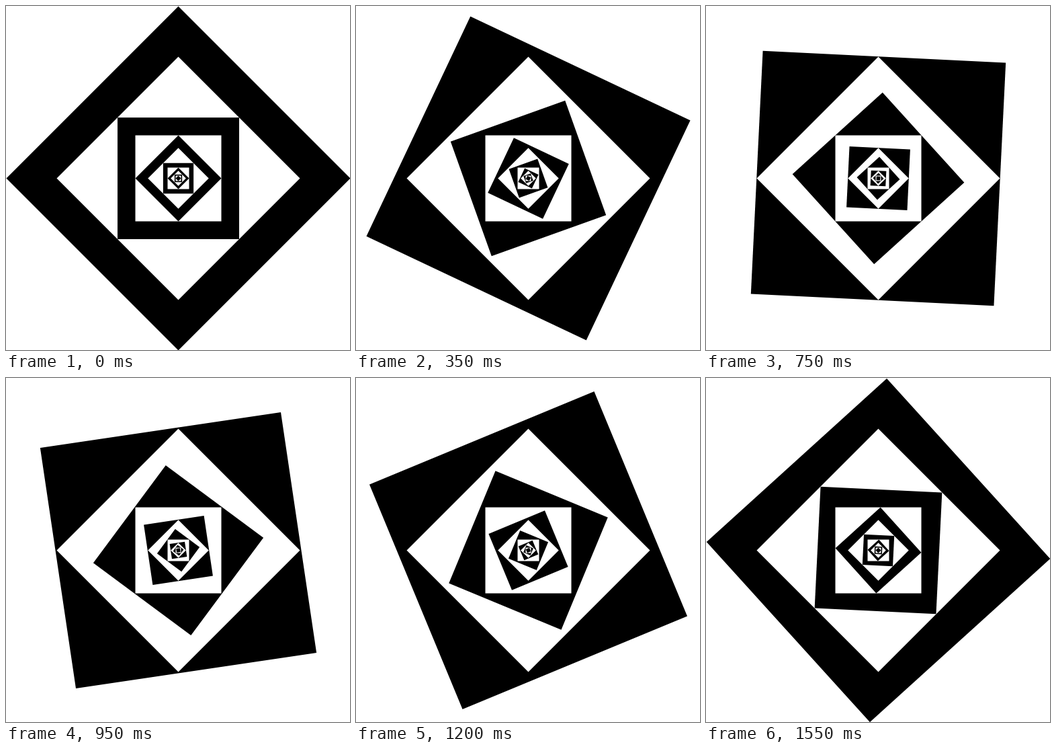
Recreate the animation shown at these times as an HTML page with a canvas. Size 512 px wide and 512 px high, loop 1600 ms.

```html
<!DOCTYPE html>
<html lang="en">
<head>
<meta charset="utf-8">
<title>Nested squares</title>
<style>
  html, body { margin: 0; width: 100%; height: 100%; overflow: hidden; background: #fff; }
  canvas { display: block; width: 512px; height: 512px; }
</style>
</head>
<body>
<canvas id="stage" width="512" height="512"></canvas>
<script>
const ctx = document.getElementById("stage").getContext("2d");
const CENTER = 256.5;
const LOOP = 1600;
const STEP = 50;
const LEVELS = 7;

// A square given by its circumradius; angle 0 stands on a corner.
function square(radius, angle, color) {
  ctx.beginPath();
  for (let i = 0; i < 4; i++) {
    const a = angle + i * Math.PI / 2;
    ctx.lineTo(CENTER + radius * Math.cos(a), CENTER + radius * Math.sin(a));
  }
  ctx.closePath();
  ctx.fillStyle = color;
  ctx.fill();
}

function draw(time) {
  const step = Math.floor((time % LOOP) / STEP);
  const turn = -(Math.PI / 2) * step * STEP / LOOP;
  ctx.fillStyle = "#fff";
  ctx.fillRect(0, 0, 512, 512);
  for (let level = 0; level < LEVELS; level++) {
    const radius = 256 / 2 ** level;
    const base = level % 2 * Math.PI / 4;
    square(radius, base + turn, "#000");
    // The white squares stay still while the black ones turn around them.
    if (level < LEVELS - 1) square(radius * Math.SQRT1_2, base, "#fff");
  }
}

const start = performance.now();
function tick() {
  draw(performance.now() - start);
  requestAnimationFrame(tick);
}
tick();
</script>
</body>
</html>
```
